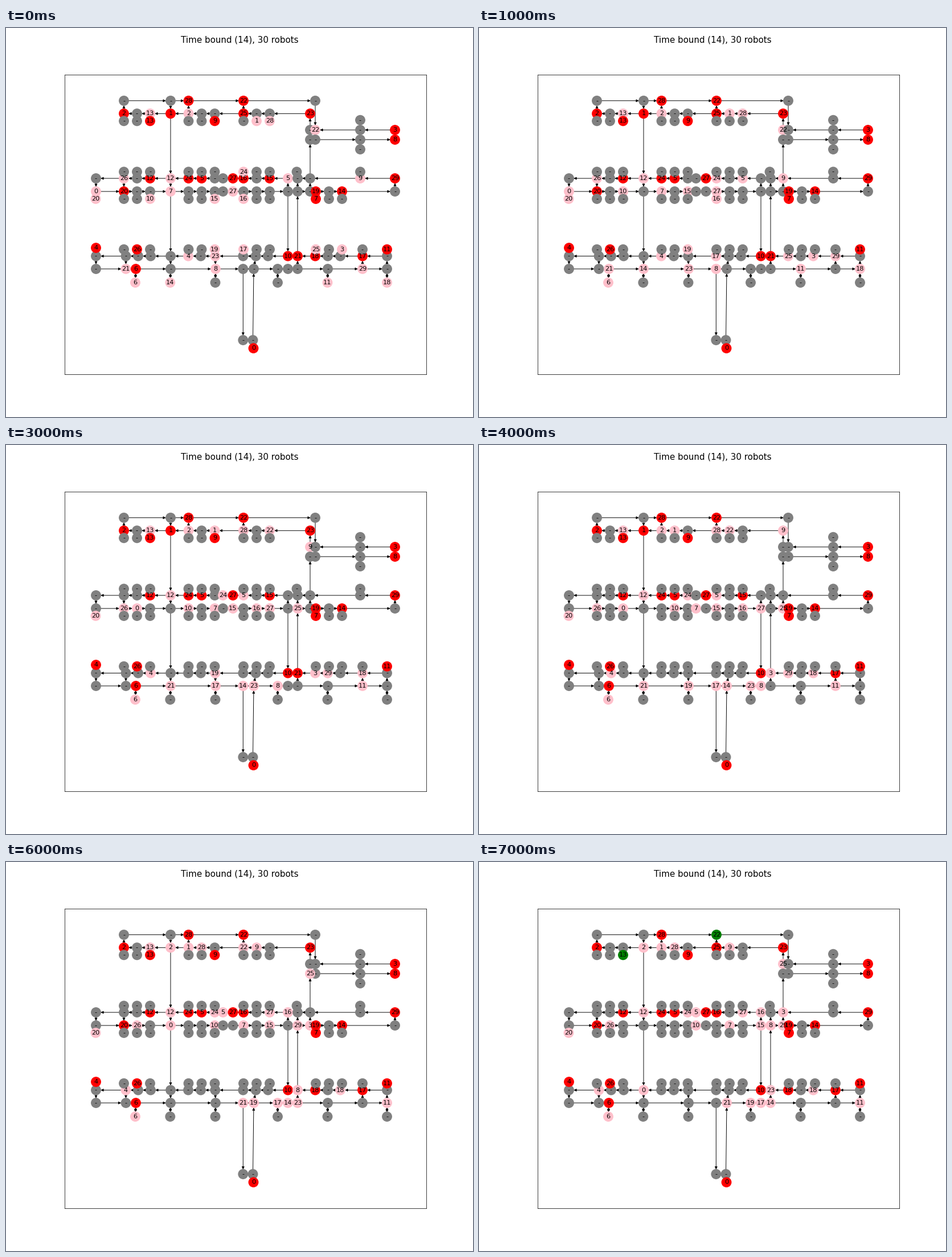
Animation of 820 by 683 pixels, one loop 8000 ms. Source, as a matplotlib script:

```python
import matplotlib.pyplot as plt
from matplotlib.animation import FuncAnimation
from matplotlib.patches import FancyArrowPatch

W, H, DPI = 820, 683, 64
K = W / 12 / DPI  # keeps point sizes in proportion to a 12 inch wide figure
STEPS = 8


def trio(x):
    """Three neighbouring bays."""
    return [x, x + 23, x + 46]


WEST, MID, EAST, DOCK = trio(207), trio(320.5), trio(417), trio(544)
BAYS = WEST + MID + EAST
HALL = [158] + WEST + [289] + MID + [381, 398.5] + EAST + [495, 512, 534]

# Row letter: (y, x positions); later rows lie on top of earlier ones.
ROWS = {
    "A": (127.7, [207, 289, 320.5, 417, 543]),
    "B": (150.3, WEST + [289] + MID + EAST + [534]),
    "L": (179, [534, 543, 622, 683]),
    "M": (196, [683, 622, 543, 534]),
    "E": (264, HALL + [622, 683]),
    "F": (287, HALL + DOCK + [683]),
    "I": (400.5, [158, 210.5, 232, 254, 289, 320, 342, 367.3, 416.3, 438.7,
                  460, 495, 512, 543, 565, 587, 626, 669]),
    "J": (423, [158, 210.5, 228, 289, 368, 416.3, 435, 477, 495, 512,
                565, 626, 669]),
    "C": (163.3, BAYS),
    "N": (161.7, [622]),
    "O": (213, [622]),
    "D": (252.5, BAYS + [510.5, 622]),
    "G": (300, [157.5] + BAYS + DOCK),
    "H": (388.7, [158] + BAYS + DOCK + [626, 669]),
    "K": (447, [227, 288.3, 367.5, 477, 564.5, 669]),
    "Q": (548, [416.3, 433.5]),
    "R": (562.3, [434.5]),
}
NODES = {f"{row}{i}": (x, y)
         for row, (y, xs) in ROWS.items() for i, x in enumerate(xs)}
NODES["H0"] = (158, 386)
NAMES = list(NODES)

FORWARD, BACKWARD = "AFJ", "BLMEI"
LINKS = """B0>A0 A1>B3 B4>A2 B7>A3 A4>L1 L0>B10 E15>M3 B3>E4 E4>F4 F4>I4
E0>F0 E1>F1 F13>E13 F14>E14 F15>E15 F19>E17 F13>I11 I12>F14
I0>J0 I1>J1 I4>J3 I7>J4 J6>I9 J9>I12 J11>I16 J12>I17 J5>Q0 Q1>J6
J2>K0 K0>J2 J3>K1 K1>J3 J4>K2 K2>J4 J7>K3 K3>J7 J10>K4 K4>J10
J12>K5 K5>J12"""

GOALS = dict(zip(
    """R0 B3 B0 L3 H0 E6 J2 G10 M0 C5 I11 H14 E3 C2 F18
    E12 E10 I16 I13 F16 F1 I12 A3 B10 E5 B7 H2 E9 A2 E17""".split(),
    range(30)))

# One route per robot, one stop per step; the last stop is held.
ROUTES = [r.split() for r in """F0 F0 F1 F2 F3 F4 F4 I4
C7 B8 B7 B6 B5 B4
B4 B4 B4 B4 B4 B3
H12 I15 I14 I13 I12 F14 F15 E15
I5 I5 I4 I3 I2 I1
E13 E12 E11 E10 E10 E9 E8
K0
F4 F5 F6 F7 F8 F9 F10 F11
J4 J5 J6 J7 J8 J9 I12 F14
E16 E15 M3 L0 B10 B9 B8
G3 F3 F4 F5 F6 F6 F7 F8
K4 J10 J11 J11 J11 J12
E4
B2 B2 B2 B2 B2 B2 B2 C2
K1 J3 J4 J5 J6 J7 J8 J9
G6 F7 F8 F9 F10 F11 F12 F13
G7 G7 F10 F11 F12 F13 E13
H7 I8 I7 J4 J5 J6 J7 J8
K5 J12 I17 I16 I15
H6 H6 H6 I7 J4 J5 J6 J7
G0
J1 J2 J2 J3 J3 J4 J5 J6
L1 L0 B10 B9 B8 B7 B7 A3
I7 J4 J5 J6 J7 J8 J9 I12
D6 E10 E9 E8 E7
H10 I13 I12 F14 F15 E15 M0 L0
E1 E1 E1 F1 F1 F2
F9 F10 F11 F12 F13 E13 E12
C8 B9 B8 B7 B7 B6 B5
J11 I16 I15 I14 I13 I12 F14 F15""".splitlines()]
ROUTES[25][6] = "M3"


def lane_edges():
    for row in FORWARD + BACKWARD:
        for i in range(len(ROWS[row][1]) - 1):
            pair = f"{row}{i}", f"{row}{i + 1}"
            yield pair if row in FORWARD else pair[::-1]


def draw_arrow(start, end):
    (x0, y0), (x1, y1) = NODES[start], NODES[end]
    if abs(x1 - x0) + abs(y1 - y0) < 18:
        return
    gap = 300 ** 0.5 / 2 * K
    ax.add_patch(FancyArrowPatch(
        (x0, y0), (x1, y1), arrowstyle="-|>", mutation_scale=10 * K,
        shrinkA=gap, shrinkB=gap, color="k", lw=K, zorder=1))


fig = plt.figure(figsize=(W / DPI, H / DPI), dpi=DPI, facecolor="white")
fig.suptitle("Time bound (14), 30 robots", y=0.98, fontsize=16 * K,
             fontfamily="DejaVu Sans")
ax = fig.add_axes([0.125, 0.11, 0.775, 0.77])
ax.set(xlim=(0.125 * W, 0.9 * W), ylim=(0.89 * H, 0.12 * H),
       xticks=[], yticks=[])
for spine in ax.spines.values():
    spine.set_linewidth(0.8 * K)

for edge in lane_edges():
    draw_arrow(*edge)
for link in LINKS.split():
    draw_arrow(*link.split(">"))

dots = ax.scatter(*zip(*NODES.values()), s=300 * K * K, lw=1.5 * K,
                  c="gray", zorder=2)
labels = [ax.text(x, y, "-", ha="center", va="center", fontsize=12 * K,
                  fontfamily="DejaVu Sans", zorder=3)
          for x, y in NODES.values()]


def update(step):
    robots = {route[min(step, len(route) - 1)]: i
              for i, route in enumerate(ROUTES)}
    colors = []
    for name, label in zip(NAMES, labels):
        robot, goal = robots.get(name), GOALS.get(name)
        if robot is not None:
            colors.append("green" if robot == goal else "pink")
            label.set_text(str(robot))
        elif goal is not None:
            colors.append("red")
            label.set_text(str(goal))
        else:
            colors.append("gray")
            label.set_text("-")
    dots.set_color(colors)
    return [dots, *labels]


anim = FuncAnimation(fig, update, frames=STEPS, interval=1000, repeat=True,
                     repeat_delay=0, blit=False)
plt.show()
```
